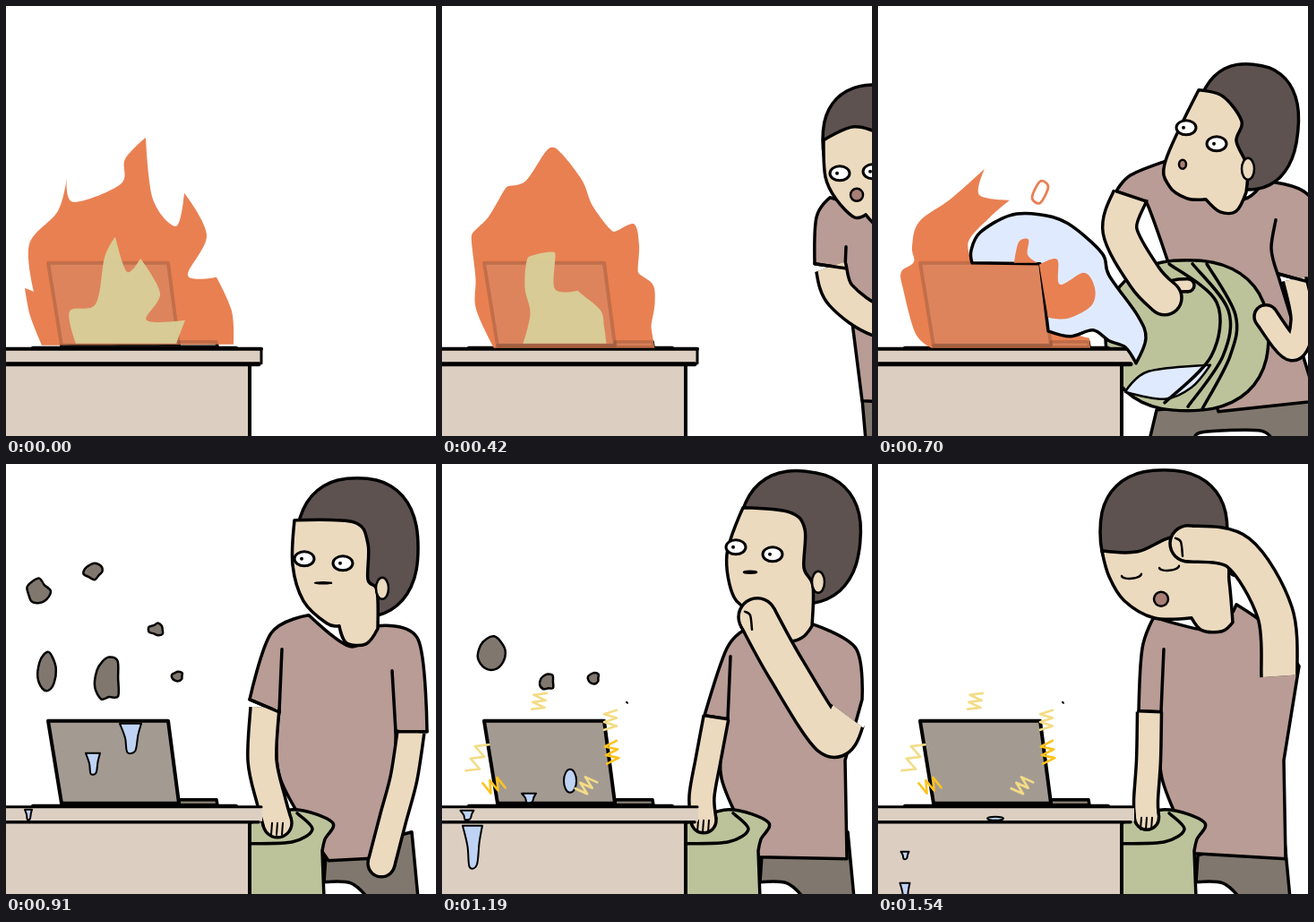
Write an HTML page with a canvas that moves like this. It is 480 px wide and 480 px high and loops after 1610 ms.

```html
<!DOCTYPE html>
<html lang="en">
<head>
<meta charset="utf-8">
<title>Laptop on fire</title>
<style>
html, body { margin: 0; width: 100%; height: 100%; overflow: hidden; background: #fff; }
canvas { display: block; width: 480px; height: 480px; }
</style>
</head>
<body>
<canvas id="stage" width="480" height="480"></canvas>
<script>
const ctx = document.getElementById('stage').getContext('2d');
const STEP = 70, LOOP = 1610, INK = 3.5;
const SKIN = '#ecdabf', HAIR = '#5d5250', SHIRT = '#b89c95', GREY = '#80776e', LIP = '#a87f74';
const GREEN = '#bcc39b', WATER = '#e0eaff', DRIP = '#bfd3f5', WOOD = '#dccfc2';
const FIRE = '#e98052', GLOW = '#d8cf98', PALE = '#f3dc86', GOLD = '#fcc31e';

const mix = (a, b, k) => a + (b - a) * k;
const clamp = k => Math.max(0, Math.min(1, k));
const ease = k => k * k * (3 - 2 * k);
const noise = n => Math.abs(Math.sin(n * 91.7) * 437.5) % 1;

// "x,y" key points; * marks a corner, stored as a third value of 1.
const points = text => text.split(' ').map(s => [...s.replace('*', '').split(',').map(Number), +s.endsWith('*')]);

// Interpolates numbers, arrays and objects of the same layout.
function blend(a, b, k) {
  if (typeof a === 'number') return mix(a, b, k);
  if (Array.isArray(a)) return a.map((v, i) => blend(v, b[i], k));
  return Object.fromEntries(Object.keys(a).map(key => [key, blend(a[key], b[key], k)]));
}

function spline(p, open) {
  const n = p.length;
  const at = i => open ? p[Math.max(0, Math.min(n - 1, i))] : p[(i + n) % n];
  const handle = (i, axis, sign) => at(i)[axis] + sign * (at(i + 1)[axis] - at(i - 1)[axis]) * .165 * (1 - at(i)[2]);
  ctx.beginPath();
  ctx.moveTo(p[0][0], p[0][1]);
  for (let i = 0; i < (open ? n - 1 : n); i++)
    ctx.bezierCurveTo(handle(i, 0, 1), handle(i, 1, 1), handle(i + 1, 0, -1), handle(i + 1, 1, -1), at(i + 1)[0], at(i + 1)[1]);
  if (!open) ctx.closePath();
}
function stroke(width = INK, color = '#000', cap = 'round') {
  ctx.lineWidth = width; ctx.strokeStyle = color; ctx.lineCap = cap; ctx.lineJoin = 'round';
  ctx.stroke();
}
function shape(p, fill, width = INK, color) {
  spline(p);
  if (fill) { ctx.fillStyle = fill; ctx.fill(); }
  if (width) stroke(width, color);
}
function line(p, width, color) { spline(p, true); stroke(width, color); }
const edge = (a, b, width) => line([[...a.slice(0, 2), 1], [...b.slice(0, 2), 1]], width);

function oval(x, y, rx, ry, fill, width = 3) {
  ctx.beginPath();
  ctx.ellipse(x, y, rx, ry, 0, 0, 7);
  ctx.fillStyle = fill; ctx.fill();
  if (width) stroke(width);
}
function squircle([cx, cy, rx, ry, turn], fill) {
  const bend = v => Math.sign(v) * Math.abs(v) ** .85;
  const ring = Array.from({ length: 24 }, (_, i) => {
    const a = i * Math.PI / 12, x = rx * bend(Math.cos(a)), y = ry * bend(Math.sin(a));
    return [cx + x * Math.cos(turn) - y * Math.sin(turn), cy + x * Math.sin(turn) + y * Math.cos(turn), 0];
  });
  shape(ring, fill);
}
// Tube with an open start and a round hand.
function limb(p, width) {
  const [x, y] = p[p.length - 1];
  for (const [w, color] of [[width + INK, '#000'], [width - INK, SKIN]]) {
    spline(p, true);
    stroke(w, color, 'butt');
    oval(x, y, w / 2, w / 2, color, 0);
  }
}
function moved(dx, dy, draw) {
  ctx.save();
  ctx.translate(dx, dy);
  draw();
  ctx.restore();
}

const makePose = o => ({
  ...o, face: points(o.face), torso: points(o.torso), left: points(o.left), right: points(o.right)
});
const carrying = makePose({
  skull: [370, 149, 60, 62, 0], ear: [404, 171], eyes: [329, 186, 366, 184], awake: 1, mouth: [348, 210, 7, 7],
  face: '311,149* 313,190 325,215 345,235 358,232* 372,246 388,247 402,235* 400,178 384,167 377,145 345,134',
  torso: '318,213* 303,235 301,287* 335,292* 342,345 354,440* 460,445* 446,262* 484,280* 450,222 400,212* 372,225',
  left: '319,290 330,322 375,352 440,355', leftWidth: 34, right: '462,268 476,277 490,290 500,300', rightWidth: 22
});
const throwing = makePose({
  skull: [412, 134, 57, 70, .1], ear: [413, 181], eyes: [344, 135, 378, 153], awake: 1, mouth: [340, 176, 4, 5],
  face: '358,93* 321,172 325,200 345,214 366,215* 382,229 400,228 411,207* 412,178 400,150 406,128 385,100',
  torso: '322,172* 282,188 266,206* 299,217* 316,262 380,452* 490,440* 446,298* 490,310* 484,215 430,195* 400,215',
  left: '282,210 270,250 298,302 320,325', leftWidth: 38, right: '465,304 474,350 462,382 433,346', rightWidth: 26
});
const standing = makePose({
  skull: [392, 93, 68, 78, 0], ear: [420, 138], eyes: [333, 105, 376, 110], awake: 1, mouth: [354, 132, 9, .5],
  face: '322,62* 320,112 332,152 358,177 372,180* 380,199 402,200 415,183* 414,140 404,128 404,88 388,64',
  torso: '338,168* 296,188 272,262* 305,276* 306,350 360,442* 436,438* 435,298* 470,298* 460,195 415,180* 385,203',
  left: '289,271 286,330 296,375 303,400', leftWidth: 32, right: '452,298 444,350 432,395 419,445', rightWidth: 30
});
const thinking = makePose({
  skull: [399, 81, 68, 74, .1], ear: [420, 131], eyes: [328, 92, 369, 100], awake: 1, mouth: [344, 120, 7, 1],
  face: '336,48* 318,100 326,148 350,165 372,178* 385,196 402,193 413,180* 414,135 404,115 405,72 388,53',
  torso: '340,183* 318,205 293,280* 319,284* 312,350 353,438* 452,440* 450,330* 469,262* 462,205 414,178* 385,196',
  left: '306,282 297,330 290,370 292,397', leftWidth: 28, right: '452,280 434,304 384,228 352,170', rightWidth: 42
});
const weary = makePose({
  skull: [319, 75, 71, 69, 0], ear: [398, 112], eyes: [283, 123, 325, 114], awake: 0, mouth: [316, 150, 8, 8],
  face: '250,96* 258,125 275,152 308,171 350,171* 362,185 384,186 396,176* 392,130 386,100 335,80 290,97',
  torso: '308,170* 295,205 291,275* 316,276* 317,350 353,434* 455,440* 453,330* 470,225* 440,185 400,156* 375,185',
  left: '303,276 302,330 299,375 300,394', leftWidth: 27, right: '448,236 443,165 402,98 346,88', rightWidth: 40
});

const standingBucket = points('272,400* 320,385 364,399 356,418 353,431* 355,484* 272,484*');
const carriedBucket = points('443,342* 486,358* 486,482* 410,450 385,435 398,395 412,369 436,369');
const cup = points('386,420 388,394 425,391 432,398 402,427');
const legs = {
  carrying: points('354,438* 358,484* 462,484* 462,430*'),
  throwing: points('311,450* 303,484* 354,484* 362,475 425,473 440,484* 490,484* 490,438*'),
  standing: points('357,436* 355,466* 385,467 404,484* 460,484* 453,410*')
};

function drawHead({ skull, ear, face, eyes, awake, mouth }) {
  squircle(skull, HAIR);
  shape(face, SKIN);
  oval(ear[0], ear[1], 7, 12, SKIN, 2.5);
  for (let e = 0; e < 4; e += 2) {
    const x = eyes[e], y = eyes[e + 1];
    if (awake > .5) {
      oval(x, y, 11, 8, '#fff');
      oval(x - 3, y, 2, 2, '#000', 0);
    } else {
      ctx.beginPath();
      ctx.ellipse(x, y, 11, 4, -.1, 0, Math.PI);
      stroke(2.5);
    }
  }
  oval(...mouth, LIP, 2.5);
}
function drawLeft(p) {
  limb(p.left, p.leftWidth);
  edge(p.torso[2], p.torso[3]);
}
function drawRight(p) {
  limb(p.right, p.rightWidth);
}
function drawBody(p, pants) {
  shape(pants, GREY);
  shape(p.torso, SHIRT);
}

function drawCarrying() {
  drawBody(carrying, legs.carrying);
  drawRight(carrying);
  edge(carrying.torso[7], carrying.torso[8]);
  edge(carrying.torso[3], [336, 268]);
  drawLeft(carrying);
  shape(carriedBucket, GREEN);
  shape(cup, WATER, 2.5);
  line(points('400,390 412,371 440,369 434,397'), 2.5);
  line(points('447,343 450,380 434,418 410,450'));
  drawHead(carrying);
}
function drawThrowing() {
  drawBody(throwing, legs.throwing);
  squircle([345, 367, 91, 84, 0], GREEN);
  shape(points('276,430* 302,407 371,400* 350,425 320,438'), WATER, 2.5);
  [0, 26, 42].forEach(d => line([[325 + d, 287, 0], [378 + d / 2, 330 + d / 3, 0], [372 + d / 2, 390, 0], [320 + d, 442 + d / 6, 0]]));
  drawRight(throwing);
  line(points('444,238 439,270 446,298* 484,308'));
  limb(points('318,318 332,312 346,311'), 14);
  drawLeft(throwing);
  drawHead(throwing);
}
function drawStanding(p, raised) {
  drawBody(p, legs.standing);
  shape(standingBucket, GREEN);
  line(points('274,423 320,421 342,407 325,389'));
  drawLeft(p);
  const [hx, hy] = p.left[3];
  for (let d = -6; d <= 6; d += 6) edge([hx + d, hy], [hx + d - 1, hy + 13], 2);
  edge(p.torso[3], [p.torso[3][0] + 3, p.torso[3][1] - 70]);
  if (!raised) {
    drawRight(p);
    edge(p.torso[7], p.torso[8]);
    edge(p.torso[7], [431, 230]);
  }
  drawHead(p);
  if (raised) {
    drawRight(p);
    const [x, y] = p.right[3];
    line([[x - 14, y - 6, 0], [x - 8, y - 2, 0], [x - 6, y + 14, 0]], 2.5);
  }
}
function person(i) {
  const entry = { 6: 115, 7: 45, 8: 0, 9: 14 };
  if (i in entry) moved(entry[i], 0, drawCarrying);
  else if (i === 10 || i === 11) drawThrowing();
  else if (i > 11) {
    const think = ease(clamp((i - 13) / 4)), tire = ease(clamp((i - 17) / 5));
    drawStanding(blend(blend(standing, thinking, think), weary, tire), think > .3);
  }
}

function desk(i) {
  ctx.fillStyle = WOOD;
  ctx.fillRect(0, 381, 286, 17);
  ctx.fillRect(0, 399, 272, 82);
  const bold = i < 12;
  edge([0, 382], [285, 382], bold ? 4 : 3);
  edge([30, 381], [257, 381], 4);
  edge([0, 399], [282, 399], bold ? 5 : 3.5);
  edge([272, 400], [272, 484], 4);
  if (i < 9) edge([285, 382], [285, 398], 3);
}

const screen = points('47,286* 181,286* 193,378* 62,378*');
const base = points('62,378* 193,378* 193,374* 235,374* 236,380* 62,380*');
function laptop() {
  shape(base, GREY);
  shape(screen, '#a39a92', 4);
}

const flames = [
  '40,378* 27,345 21,314* 31,318* 26,265 58,228 68,190* 75,218 128,198 133,170 156,146* 164,215 190,245 199,208* 224,255 203,300 235,302* 252,340 254,377*',
  '58,381* 36,350 30,315 36,265 48,213 64,222 95,172 110,137 135,182 160,212 182,221 202,264* 215,249 226,270 216,298* 232,296 242,322 221,338* 237,381*',
  '58,381* 40,325 45,290 30,246* 56,256 80,181* 92,217 128,180 133,147* 153,176 155,225 180,238 213,236 214,262 222,295 239,325 233,342 246,375 238,381*',
  '60,381* 42,365 28,315 26,296 40,285 38,268 46,240 82,214 119,181* 113,210 147,216* 125,235 101,262 106,287* 181,287* 190,350* 215,364 236,370* 237,381*'
].map(points);
const glows = [
  '78,376* 71,340 100,332 110,280 122,257* 135,296 150,281* 172,320 157,350 200,350* 190,376*',
  '89,376* 103,345 109,305 112,260* 126,285 140,335 166,329* 170,352 180,358 190,365 187,376*',
  '92,376* 94,340 76,322 80,300 126,264* 112,295 138,305* 142,290 174,320 172,350 180,376*'
].map(points);

function embers(i) {
  const ember = (x, y, w, h, lean) =>
    shape([[x - w, y + lean, 0], [x, y - h, 0], [x + w, y - lean, 0], [x, y + h, 0]], '#fff', 2.8, FIRE);
  const rise = (from, draw) => moved(0, (from - i) * 7, draw);
  if (i > 2 && i < 6) rise(4, () => { ember(180, 172, 8, 13, 5); ember(209, 225, 4, 11, 1); });
  if (i > 6 && i < 10) rise(8, () => {
    ember(86, 141, 3, 12, 1);
    ember(40, 206, 3, 11, 1);
    ember(167, 141, 8, 11, -2);
    ember(221, 234, 8, 8, -3);
  });
  if (i === 10) ember(181, 207, 9, 12, 6);
}

function fire(i) {
  if (i > 11) return;
  const from = i < 4 ? 0 : i < 8 ? 1 : 2;
  const k = i < 8 ? (i % 4) / 4 : Math.min(1, (i - 8) / 2);
  ctx.save();
  if (i === 11) { ctx.translate(0, 171); ctx.scale(1, .55); }
  shape(blend(flames[from], flames[from + 1], k), FIRE, 0);
  ctx.restore();
  ctx.globalAlpha = .15;
  laptop();
  ctx.globalAlpha = .95;
  if (i < 9) shape(blend(glows[from], glows[Math.min(2, from + 1)], k), GLOW, 0);
  ctx.globalAlpha = 1;
  embers(i);
}

const wave = points('105,286* 104,272 114,252 147,233 180,232 212,242 250,275 258,300 290,345 299,370 288,398* 276,380 258,373 240,361 215,368 190,362* 181,287*');
function splash(i) {
  if (i !== 10 && i !== 11) return;
  shape(wave, WATER);
  if (i === 11) return;
  shape(points('152,286* 157,263 168,260 167,277 178,286*'), FIRE, 0);
  shape(points('180,288* 200,282 203,310 230,297 242,314 238,334 212,348 190,347*'), FIRE, 0);
}

function puff(x, y, rx, ry, seed) {
  const ring = Array.from({ length: 9 }, (_, j) => {
    const a = j * Math.PI * 2 / 9, r = .75 + .4 * noise(seed * 10 + j);
    return [x + rx * r * Math.cos(a), y + ry * r * Math.sin(a), 0];
  });
  shape(ring, GREY, 2.5);
}
function smoke(i) {
  if (i < 12 || i > 19) return;
  if (i < 16) [[35, 141, 13, 14], [97, 119, 11, 9], [168, 184, 8, 7]].forEach(([x, y, rx, ry], s) =>
    puff(x, y - (i - 13) * 14, rx, ry, s + 1));
  const k = clamp((i - 13) / 4), lift = i < 13 ? 12 : Math.min(0, (17 - i) * 12);
  const tall = [[46, 228, 10, 23], [113, 238, 14, 28], [191, 236, 7, 5]];
  const faded = [[56, 208, 15, 20], [117, 242, 8, 10], [169, 238, 7, 6]];
  moved(0, lift, () => tall.forEach((t, s) => puff(...blend(t, faded[s], k), s + 4)));
}

function drip(x, y, w, h) {
  shape([[-.5, 0, 1], [.5, 0, 1], [.35, .4, 0], [.22, .95, 0], [-.15, 1, 0], [-.25, .5, 0]]
    .map(([u, v, c]) => [x + u * w, y + v * h, c]), DRIP, 2);
}
function drips(i) {
  if (i < 12) return;
  if (i < 17) {
    const fall = Math.max(0, i - 13) * 9;
    drip(139, 289 + fall, 24, 32);
    drip(97, 322 + fall, 16, 23);
  } else if (i < 20) {
    oval(143, 353 + (i - 17) * 9, 7, 13, DRIP, 2);
    drip(97, 367, 16, 10);
  }
  if (i < 15) drip(25, 385, 8, 11);
  else if (i < 21) {
    drip(28, 386, 15, 10);
    drip(34, 403 + (i - 17) * 10, 22, 46);
  } else {
    oval(131, 395, 9, 2, DRIP, 2);
    drip(30, 432 + (i - 22) * 10, 9, 8);
    drip(30, 467 + (i - 22) * 10, 11, 20);
  }
}

// Zigzag along (dx, dy), swinging sideways.
function bolt(x, y, dx, dy, color) {
  const size = Math.hypot(dx, dy), zig = [];
  for (let j = 0; j < 6; j++) {
    const side = (j % 2 ? 7 : -7) / size;
    zig.push([x + dx * j / 5 - dy * side, y + dy * j / 5 + dx * side, 1]);
  }
  line(zig, 2.6, color);
}
function sparks(i) {
  if (i < 16) return;
  bolt(110, 254, -3, 20, PALE);
  bolt(188, 274, 0, 22, PALE);
  bolt(46, 310, -13, 34, PALE);
  bolt(168, 350, -14, 16, PALE);
  edge([206, 265], [207, 266], 2);
  bolt(188, 309, 3, 24, GOLD);
  bolt(68, 354, -20, 8, GOLD);
}

function render() {
  const i = Math.floor((performance.now() % LOOP) / STEP);
  ctx.fillStyle = '#fff';
  ctx.fillRect(0, 0, 480, 480);
  moved(0, .8, () => [person, desk, laptop, fire, splash, smoke, drips, sparks].forEach(draw => draw(i)));
  requestAnimationFrame(render);
}
render();
</script>
</body>
</html>
```
